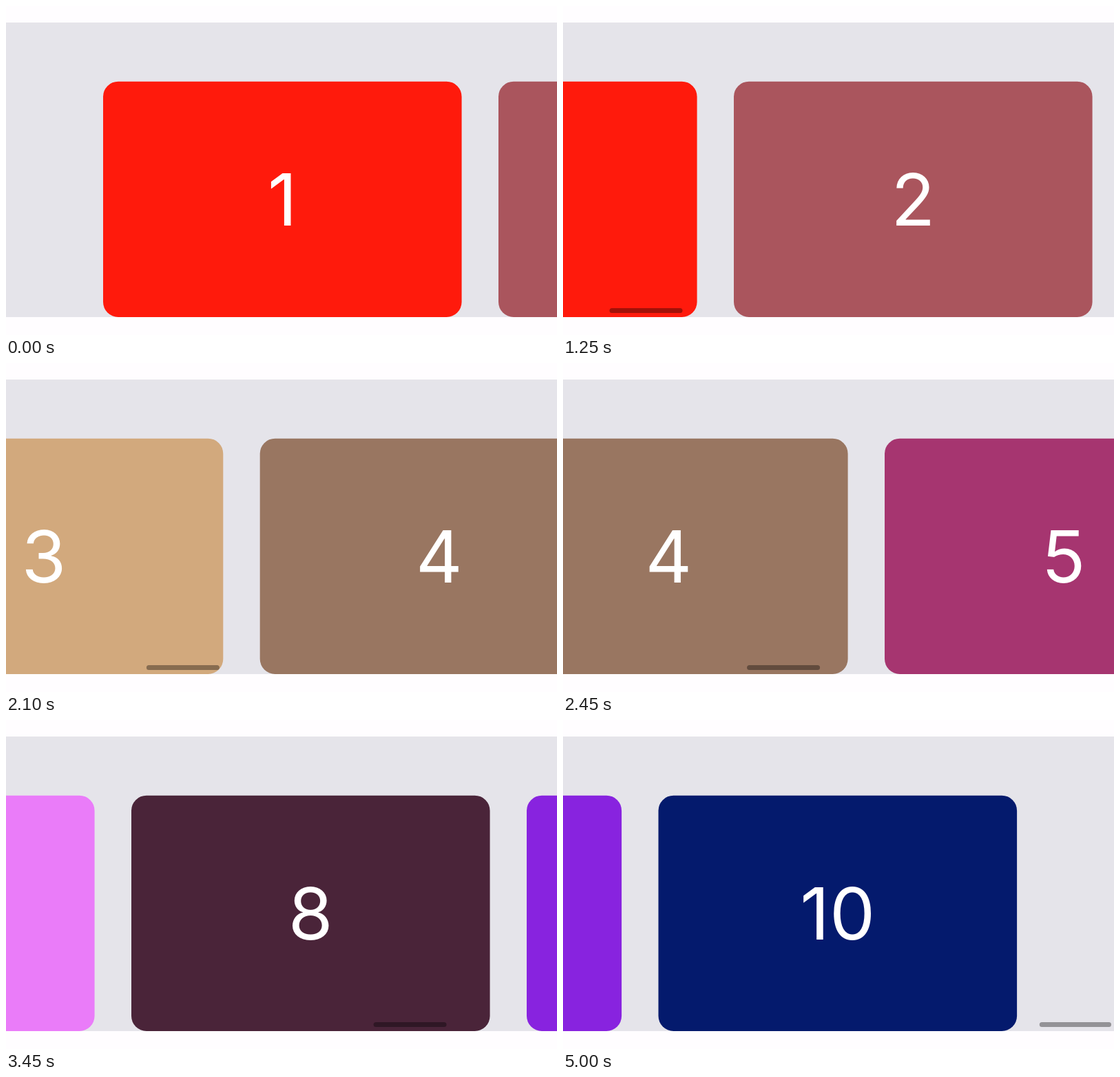
Write an HTML page that moves like this. It is 800 px wide and 478 px high and loops after 5.05 s.

```html
<!DOCTYPE html>
<html lang="en">
<head>
<meta charset="utf-8">
<title>Card carousel</title>
<style>
  html, body { margin: 0; width: 100%; height: 100%; overflow: hidden; background: #fffdff; }
  svg { display: block; width: 100%; height: 100%; }
  text {
    font: 400 105px Inter, "Liberation Sans", sans-serif;
    font-optical-sizing: none;
    fill: #fff;
    text-anchor: middle;
  }
</style>
</head>
<body>
<svg viewBox="0 0 800 478">
  <rect y="24" width="800" height="428" fill="#e5e4ea"/>
  <g id="track"></g>
  <rect id="bar" y="439" height="7" rx="3.5"/>
</svg>
<script>
  const LOOP = 5050, STEP = 50;
  const FIRST_X = 141, PITCH = 574, CARD_W = 520.6;
  const COLORS = ['#ff1a0c', '#aa555d', '#d2a97d', '#997661', '#a63570',
                  '#8a6a8f', '#ea7cf9', '#4a2439', '#8823df', '#041a6d'];
  const MAX_SCROLL = PITCH * (COLORS.length - 1);
  const BAR = { left: 5.5, travel: 686, width: 106, limit: 796 };
  const DRAG_START = 700;

  // Key points of the scroll: time in ms, offset in px
  const KEYS = [
    [DRAG_START, 0], [1250, 467], [1750, 1074], [2450, 1970],
    [3450, 3977], [4200, 4603.5], [5000, 5168.5]
  ].map(([t, s]) => ({ t, s }));

  const track = document.getElementById('track');
  const bar = document.getElementById('bar');

  track.innerHTML = COLORS.map((color, i) => {
    const x = FIRST_X + i * PITCH;
    return `<rect x="${x}" y="109.7" width="${CARD_W}" height="342.3" rx="22" fill="${color}"/>
            <text x="${x + CARD_W / 2}" y="319">${i + 1}</text>`;
  }).join('');

  const clamp = (v, lo, hi) => Math.min(hi, Math.max(lo, v));

  // Mean speed between a key point and the next; at rest outside them
  function speed(i) {
    const a = KEYS[i], b = KEYS[i + 1];
    return a && b ? (b.s - a.s) / (b.t - a.t) : 0;
  }

  // Harmonic mean keeps the curve free of overshoot
  function slope(i) {
    const a = speed(i - 1), b = speed(i);
    return a * b > 0 ? 2 * a * b / (a + b) : 0;
  }

  function scrollAt(time) {
    const t = clamp(time, KEYS[0].t, KEYS.at(-1).t);
    const i = Math.max(1, KEYS.findIndex(key => t <= key.t));
    const a = KEYS[i - 1], b = KEYS[i];
    const span = b.t - a.t, u = (t - a.t) / span, v = 1 - u;
    return a.s * (1 + 2 * u) * v * v + b.s * (1 + 2 * v) * u * u
         + span * u * v * (slope(i - 1) * v - slope(i) * u);
  }

  function draw(t) {
    const s = scrollAt(t);
    const x = BAR.left + s / MAX_SCROLL * BAR.travel;
    track.setAttribute('transform', `translate(${-s.toFixed(1)} 0)`);
    bar.setAttribute('x', x.toFixed(1));
    bar.setAttribute('width', Math.min(BAR.width, BAR.limit - x).toFixed(1));
    bar.setAttribute('opacity', 0.36 * clamp((t - DRAG_START) / 150, 0, 1));
  }

  const start = performance.now();
  function tick() {
    // Half a refresh of lead keeps steps on their nominal times
    const elapsed = performance.now() - start + 8;
    draw(Math.floor(elapsed % LOOP / STEP) * STEP);
    requestAnimationFrame(tick);
  }
  tick();
</script>
</body>
</html>
```
